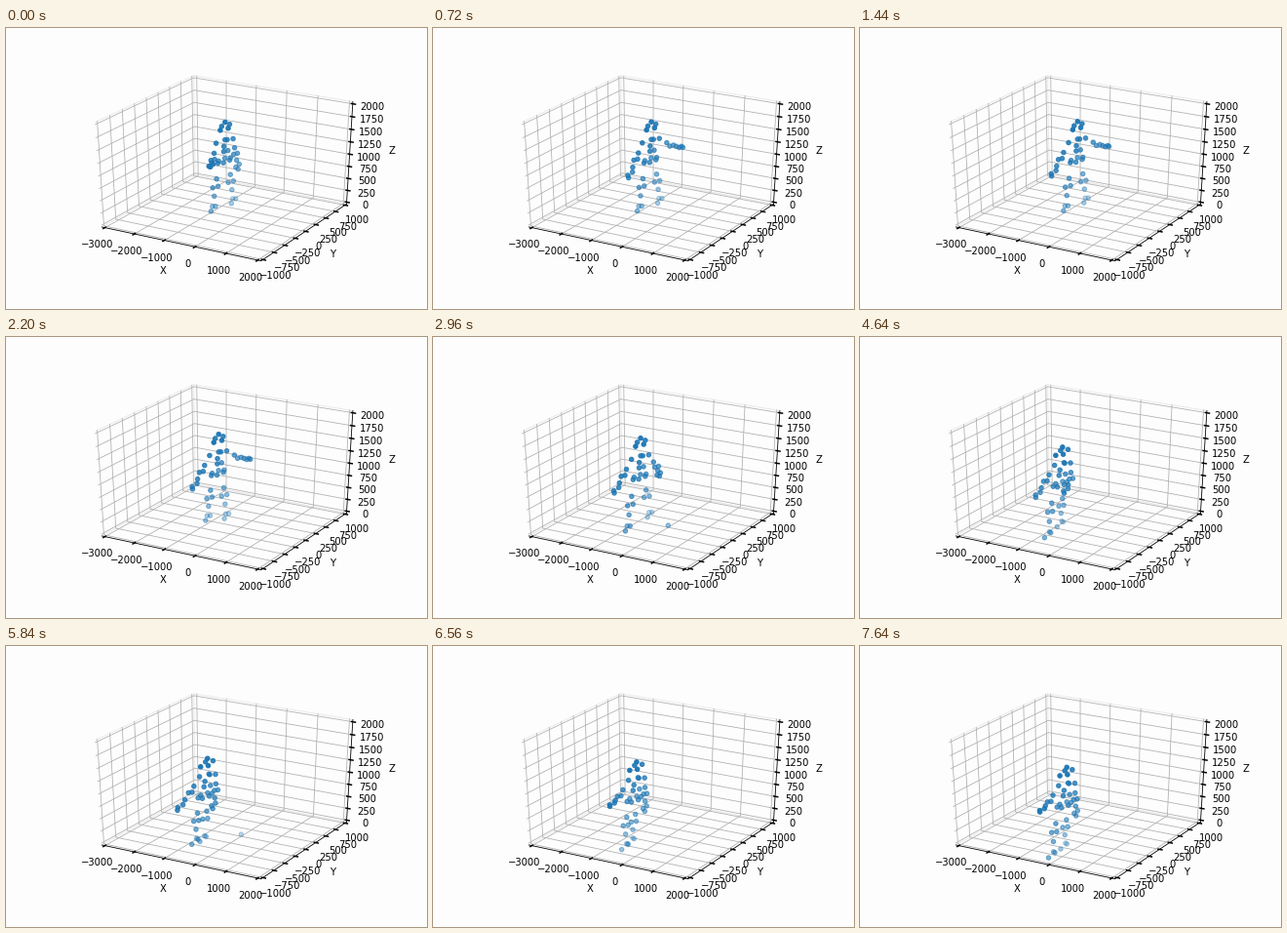
A matplotlib script that plays this animation: 432x288 px, repeating every 7680 ms.

```python
import numpy as np
import matplotlib.pyplot as plt
from matplotlib.animation import FuncAnimation

W, H, DPI = 432, 288, 72
FRAMES, STEP = 192, 40
BLUE = (0x1F / 255, 0x77 / 255, 0xB4 / 255)
EDGE = 0.5 + 1 / 48          # box half-size with margin
LOW = np.array([-3000, -1000, 0])
SPAN = np.array([5000, 2000, 2000])

# Camera at elevation 30, azimuth -60, distance 10
S3 = np.sqrt(3) / 2
RIGHT = np.array([S3, 0.5, 0])
UP = np.array([-0.25, S3 / 2, S3])
NEAR = np.array([S3 / 2, -0.75, 0.5])

plt.rcParams["font.family"] = "DejaVu Sans"
fig = plt.figure(figsize=(W / DPI, H / DPI), dpi=DPI, facecolor="#fdfdfd")
ax = fig.add_axes([0, 0, 1, 1])
ax.set_xlim(0, W)
ax.set_ylim(H, 0)
ax.axis("off")


def project(p):
    """Centred unit-cube coordinates to stage pixels."""
    p = np.asarray(p, float)
    w = 10 - p @ NEAR
    x = 0.125 * W + (p @ RIGHT / w + 0.095) / 0.185 * 0.775 * W
    y = 0.875 * H - (p @ UP / w + 0.095) / 0.185 * 0.755 * H
    return np.stack([x, y], -1)


def line(points, color, width=0.8, z=1):
    ax.plot(*project(points).T, color=color, lw=width, zorder=z)


def label(p, text, va):
    x, y = project(p)
    ax.text(x, y, text, fontsize=10, ha="center", va=va, zorder=4)


def draw_axis(k, edge, corners, ticks, tick_dir):
    """edge: signs of the axis line; corners: sign path of its grid lines."""
    edge = np.array(edge, float)
    ends = np.array([edge, edge]) * EDGE
    ends[:, k] = -EDGE, EDGE
    line(ends, "black", z=3)
    for value in ticks:
        c = (value - LOW[k]) / SPAN[k] - 0.5
        grid = np.array(corners, float) * EDGE
        grid[:, k] = c
        line(grid, "#b0b0b0")
        mark = np.array([edge, edge]) * EDGE
        mark[:, k] = c
        mark[:, tick_dir] += edge[tick_dir] * np.array([0.2, -0.1]) / 12
        line(mark, "black", 1.5, 3)
        at = edge * (EDGE + 0.0833)
        at[k] = c
        label(at, str(value).replace("-", "\u2212"), "top")
    at = edge * (EDGE + 0.181)
    at[k] = 0
    label(at, "XYZ"[k], "center")


# Open outlines of the three back panes
for pane in ([(-1, -1, -1), (-1, 1, -1), (-1, 1, 1), (-1, -1, 1)],
             [(-1, 1, -1), (1, 1, -1), (1, 1, 1), (-1, 1, 1)],
             [(-1, -1, -1), (1, -1, -1), (1, 1, -1), (-1, 1, -1)]):
    line(np.array(pane) * EDGE, "#ebebeb", 1, 0)

draw_axis(0, (0, -1, -1), [(0, -1, -1), (0, 1, -1), (0, 1, 1)],
          range(-3000, 2001, 1000), 1)
draw_axis(1, (1, 0, -1), [(1, 0, -1), (-1, 0, -1), (-1, 0, 1)],
          range(-1000, 1001, 250), 0)
draw_axis(2, (1, 1, 0), [(-1, -1, 0), (-1, 1, 0), (1, 1, 0)],
          range(0, 2001, 250), 0)


# Walking figure in body coordinates: left, forward, height in mm
WHEN = [0, 1.44, 2.96, 4.64, 5.84, 7.64]
ROOT_X = [-820, -885, -780, -550, -470, 40]
ROOT_Y = [195, 206, -88, -312, -389, -623]
TORSO = np.array([(-160, 0, 1350), (160, 0, 1350), (0, -60, 1350), (50, 20, 1370),
                  (0, 90, 1280), (0, 100, 1180), (60, -60, 1120)])
LOST = [(0.4, 0.6), (2.8, 3.3), (4.0, 4.2), (5.7, 6.0)]


def ease(t, a, b):
    s = np.clip((t - a) / (b - a), 0, 1)
    return s * s * (3 - 2 * s)


def mix(a, b, s):
    return a + (b - a) * s


def ring(n, half_width, half_depth, center):
    a = 2 * np.pi * (np.arange(n) + 0.5) / n
    flat = np.stack([half_width * np.cos(a), half_depth * np.sin(a), 0 * a], -1)
    return flat + center


def bone(length, side, spread, bend):
    """Limb vector hanging down, opened sideways and bent forward (degrees)."""
    s, b = np.radians([spread, bend])
    return length * np.array([side * np.sin(s) * np.cos(b), np.sin(b),
                              -np.cos(s) * np.cos(b)])


def arm(shoulder, side, spread, fore, bend):
    elbow = shoulder + bone(320, side, spread, 0)
    hand = elbow + bone(280, side, fore, bend)
    out = np.array([35, 0, 0])
    return [mix(shoulder, elbow, 0.6), elbow - out, elbow + out,
            mix(elbow, hand, 0.5), mix(elbow, hand, 0.85) + out,
            hand - out, mix(elbow, hand, 1.2)]


def leg(side, width, forward, lift):
    hip = np.array([side * 100, 0, 920])
    foot = np.array([side * width, forward, 80 + lift])
    knee = mix(hip, foot, 0.5) + (0, 60, 0)
    out = np.array([50, 0, 0])
    return [mix(hip, knee, 0.65), knee - out, knee + out, mix(knee, foot, 0.45),
            foot + out, foot - (20, 90, 20), foot + (-20, 110, -30)]


def pose(t):
    turn = ease(t, 2.7, 4.6)

    # Right arm opens, then lifts forward; left arm reaches out and returns
    r_spread = 10 + 18 * ease(t, 0, 1.2)
    r_bend = 90 * (1 - ease(t, 0, 0.9)) + 85 * ease(t, 5, 6.6)
    reach = ease(t, 0, 0.8) - ease(t, 2.3, 3.6)
    l_bend = 45 * reach + 70 * (ease(t, 2.3, 3.4) - ease(t, 4.2, 7.2))

    phase = 2 * np.pi * (t - 4.55) / 1.6
    gait = ease(t, 1.4, 2.4)
    stride = mix(100, 90 + 280 * np.cos(phase), gait) / 2
    lift = 60 * gait * np.sin(phase)
    width = mix(190, 40, turn)

    body = np.vstack([
        ring(4, 105, 140, (0, 100 * turn, 1620)),
        [(0, 100 * turn, 1720)],
        TORSO,
        ring(6, 130, 110, (0, 0, 960)),
        arm(TORSO[0], -1, r_spread, r_spread, r_bend),
        arm(TORSO[1], 1, 10 + 40 * reach, 10 + 80 * reach, l_bend),
        leg(-1, width, stride, max(0, -lift)),
        leg(1, width, -stride, max(0, lift)),
    ])
    body[:, 0] -= mix(40, 230, turn) * (1 - body[:, 2] / 1640)

    yaw = np.radians(mix(-42, -60, turn))
    c, s = np.cos(yaw), np.sin(yaw)
    left, ahead, up = body.T
    world = np.stack([np.interp(t, WHEN, ROOT_X) + ahead * c - left * s,
                      np.interp(t, WHEN, ROOT_Y) + ahead * s + left * c, up], -1)
    # A marker that is not tracked drops to the origin
    if any(a <= t < b for a, b in LOST):
        world[-4] = 0
    return (world - LOW) / SPAN - 0.5


dots = ax.scatter([], [], s=20, linewidths=1, zorder=5)


def draw(i):
    points = pose(i * STEP / 1000)
    near = points @ NEAR
    # Farther markers fade
    alpha = 0.3 + 0.7 * (near - near.min()) / np.ptp(near)
    order = np.argsort(near)
    colors = np.column_stack([np.tile(BLUE, (len(points), 1)), alpha[order]])
    dots.set_offsets(project(points[order]))
    dots.set_facecolors(colors)
    dots.set_edgecolors(colors)
    return dots,


anim = FuncAnimation(fig, draw, frames=FRAMES, interval=STEP, repeat=True,
                     repeat_delay=0)
plt.show()
```
